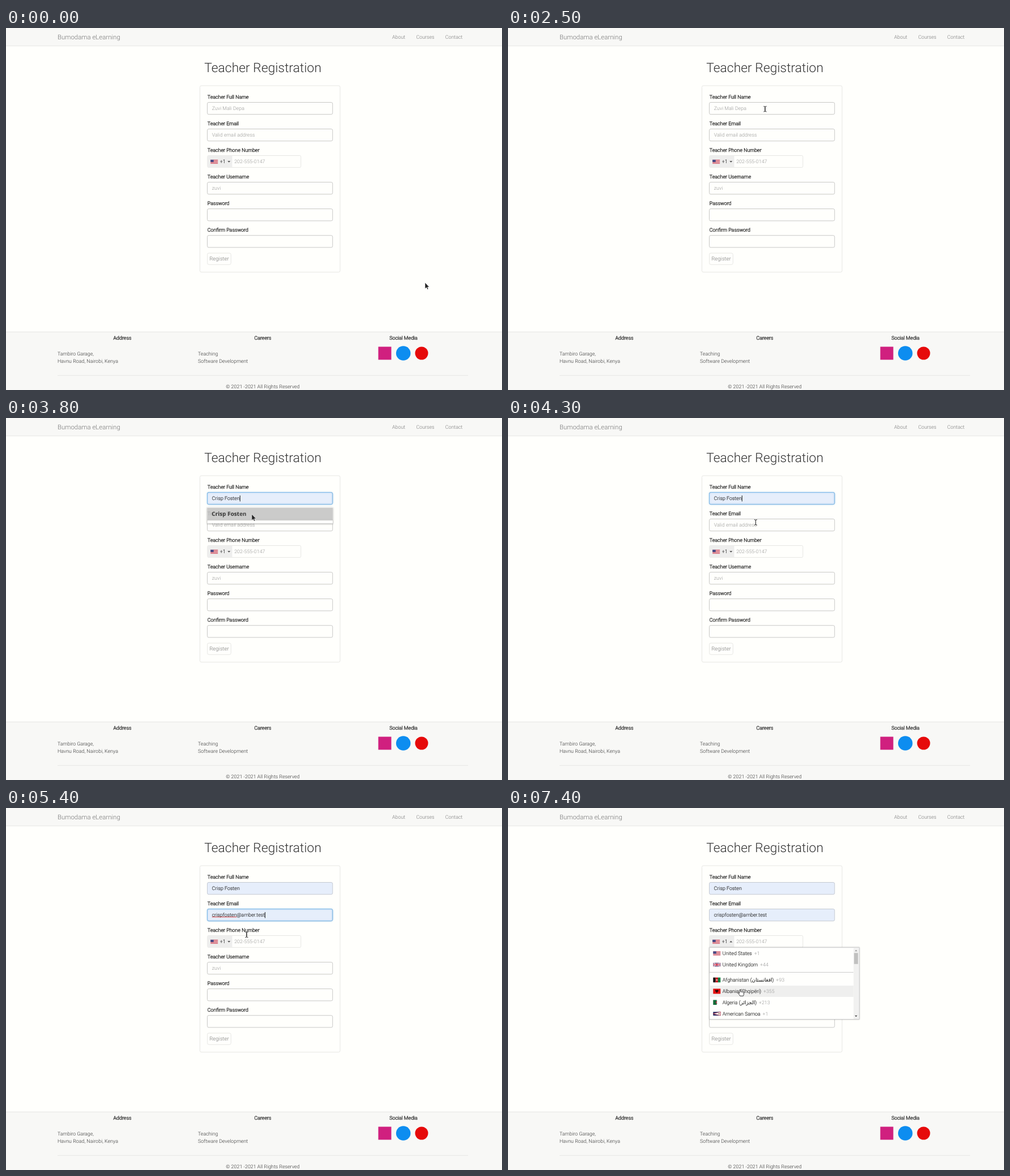
These frames come from a looping animation (876 by 640 pixels, 8 s). An HTML page:

```html
<!DOCTYPE html>
<html lang="en">
<head>
<meta charset="utf-8">
<title>Teacher Registration</title>
<style>
html, body { margin: 0; width: 100%; height: 100%; overflow: hidden; background: #fffffc }
svg { display: block; font: 300 8.9px Roboto, sans-serif; text-rendering: geometricPrecision }
text { fill: #333; white-space: pre }
.bar { fill: #f8f8f6 }
.line { fill: none; stroke: #e7e7e4 }
.nav { fill: #777 }
.bold { stroke: #333; stroke-width: .4 }
.dark { fill: #2a2a2a; stroke: #2a2a2a; stroke-width: .15 }
.mid { text-anchor: middle }
.hint { fill: #959595; stroke: none }
.box { fill: #fffffc; stroke: #c8c8c6 }
.box.filled { fill: #e6eefb; stroke: #c4c9d2 }
.glow { fill: none; stroke: #79b7e8; filter: drop-shadow(0 0 1.6px #66afe999) }
.preview { font: 400 8.9px "Liberation Sans", sans-serif; fill: #111 }
.popup { fill: #fffffd; filter: drop-shadow(0 1.5px 1.5px #0006) }
.sheet { fill: #fffffd; stroke: #ccc; filter: drop-shadow(.6px .6px 1.2px #0004) }
.option { font: 600 10px "Noto Sans", sans-serif; fill: #2c2c2c }
.halo { stroke: #fff; fill: none; stroke-width: 2; opacity: .7 }
.beam { stroke: #222; fill: none; stroke-width: 1 }
</style>
</head>
<body>
<svg width="876" height="640" viewBox="0 0 876 640"></svg>
<script>
const PERSON = 'Crisp Fosten', USER = 'crispfosten', MAIL = USER + '@amber.test';
const svg = document.querySelector('svg');

const rect = (x, y, w, h, attrs = '') => `<rect x="${x}" y="${y}" width="${w}" height="${h}" ${attrs}/>`;
const text = (x, y, s, cls = '', attrs = '') => `<text x="${x}" y="${y}" class="${cls}" ${attrs}>${s}</text>`;
const path = (d, attrs = '') => `<path d="${d}" ${attrs}/>`;

// Flags are drawn in a 13-unit wide box
const flags = {
  us: rect(0, 0, 13, 7, 'fill="#f4e9ea"') +
    [0, 2, 4, 6].map(y => rect(0, y, 13, 1, 'fill="#c8354a"')).join('') + rect(0, 0, 5.5, 4, 'fill="#434a86"'),
  uk: rect(0, 0, 13, 6.5, 'fill="#2b3a78"') +
    path('M0 0 13 6.5M13 0 0 6.5M6.5 0V6.5M0 3.25H13', 'stroke="#fff" stroke-width="1.8"') +
    path('M0 0 13 6.5M13 0 0 6.5', 'stroke="#c8102e" stroke-width=".5"') +
    path('M6.5 0V6.5M0 3.25H13', 'stroke="#c8102e" stroke-width="1.1"'),
  af: rect(0, 0, 4.4, 8.6, 'fill="#111"') + rect(4.3, 0, 4.4, 8.6, 'fill="#c4141c"') +
    rect(8.6, 0, 4.4, 8.6, 'fill="#0a8043"') + '<circle cx="6.5" cy="4.3" r="1.5" fill="#e6a9a5"/>',
  al: rect(0, 0, 13, 9, 'fill="#e3100f"') +
    path('M6.5 2.8 8.6 1.6 9.6 4.5 7.6 5.4 6.5 7.8 5.4 5.4 3.4 4.5 4.4 1.6Z', 'fill="#2a0505"'),
  dz: rect(0, 0, 6.5, 8.6, 'fill="#126b38"') + rect(6.5, 0, 6.5, 8.6, 'fill="#fff"') +
    path('M7.8 2.8A2 2 0 1 0 7.8 5.8 1.6 1.6 0 1 1 7.8 2.8Z', 'fill="#d21034"'),
  as: rect(0, 0, 13, 6.5, 'fill="#22285f"') + path('M13 0V6.5L0 3.25Z', 'fill="#fff" stroke="#b5263c" stroke-width=".7"') +
    path('M8 3 12 2.2 11 4.4Z', 'fill="#8a5a33"')
};
const flag = (id, x, cy) => {
  const h = { us: 7, uk: 6.5, af: 8.6, al: 9, dz: 8.6, as: 6.5 }[id];
  return `<g transform="translate(${x} ${cy - h / 2})">${flags[id]}</g>`;
};

const fields = [
  ['Teacher Full Name', 'Zuvi Mali Depa'], ['Teacher Email', 'Valid email address'], ['Teacher Phone Number'],
  ['Teacher Username', 'zuvi'], ['Password', ''], ['Confirm Password', '']
];
const form = fields.map(([label, hint], i) => {
  const y = 131.5 + i * 47.05;
  return text(355.8, y - 7, label, 'bold') + (hint === undefined ? '' :
    rect(355.5, y, 221.3, 21.2, `rx="2.5" class="box" id="box${i}"`) + text(363.8, y + 13.6, hint, 'hint', `id="hint${i}"`));
}).join('');

// Filled value, focus glow, caret and suggestion popup of a field
const live = (i, value) => {
  const y = 131.5 + i * 47.05;
  return rect(355.5, y, 221.3, 21.2, `rx="2.5" class="glow" id="glow${i}"`) +
    text(363.8, y + 13.6, value, '', `id="value${i}"`) +
    rect(363.8, y + 5.5, .9, 10.5, `id="caret${i}"`);
};
const popup = (i, value) => {
  const y = 158 + i * 47.05;
  return `<g id="popup${i}">` + rect(355.3, y - .7, 222, 29, 'class="popup"') +
    rect(355.3, y + .5, 221.7, 22.7, `fill="#c6c6c5" id="hot${i}"`) + text(363.3, y + 15.4, value, 'option') + '</g>';
};

const countries = [
  ['us', 257, 'United States', 1], ['uk', 277, 'United Kingdom', 44],
  ['af', 304, 'Afghanistan (افغانستان\u200e)', 93], ['al', 324, 'Albania (Shqipëri)', 355],
  ['dz', 343.7, 'Algeria (الجزائر\u200e)', 213], ['as', 363.7, 'American Samoa', 1]
];
const list = '<g id="list">' + rect(355.8, 246.7, 264.5, 126.8, 'class="sheet"') +
  rect(356.3, 0, 254, 19.8, 'fill="#efefee" id="row"') +
  path('M356 290.5H610', 'stroke="#ccc"') +
  countries.map(([id, y, name, code]) => flag(id, 362.3, y) +
    text(378.8, y + 3.2, `${name}<tspan class="hint" dx="3.8">+${code}</tspan>`, 'dark')).join('') +
  rect(610.3, 247.2, 9.5, 125.8, 'fill="#f1f1f0"') + rect(611.2, 256.3, 7, 19.5, 'fill="#c1c1c0"') +
  path('M612.5 253.3h4.4l-2.2-2.6z', 'fill="#999"') + path('M612.5 366.7h4.4l-2.2 2.6z', 'fill="#444"') + '</g>';

const beam = 'M-2.5-4.8Q0-4.8 0-3.5V3.5Q0 4.8-2.5 4.8M2.5-4.8Q0-4.8 0-3.5V3.5Q0 4.8 2.5 4.8';
const cursors =
  path('M0 0V11L2.6 8.7 4.2 12.3 6 11.5 4.4 8.1H7.6Z', 'id="arrow" fill="#222" stroke="#fff" stroke-width=".6"') +
  `<g id="beam">${path(beam, 'class="halo"')}${path(beam, 'class="beam"')}</g>` +
  path('M-2.6 1.2V-4.8Q-1.6-6.2-.6-4.8V-1.6Q3-1.8 5-.2V3Q4.6 4.4 4 5.8H-1.6Q-3.6 3-5 1-4.4-.7-2.6 1.2Z',
    'id="hand" fill="#fff" stroke="#222" stroke-width=".9"');

svg.innerHTML =
  rect(0, 0, 876, 31.5, 'class="bar"') + path('M0 31.7H876', 'class="line"') +
  text(91, 19.7, 'Bumodama eLearning', 'nav', 'font-size="11.45"') +
  text(682, 19, 'About', 'nav') + text(724.4, 19, 'Courses', 'nav') + text(775.7, 19, 'Contact', 'nav') +
  text(350.2, 77.5, 'Teacher Registration', '', 'font-size="22.9"') +
  rect(342.5, 102, 247.5, 329.6, 'rx="2.5" class="line"') + form +
  rect(355.8, 225.5, 165, 21, 'rx="2" class="line"') + rect(356, 225.7, 43.5, 20.7, 'fill="#eeeeed"') +
  flag('us', 361.2, 236.4) + text(377.8, 239.2, '+1', 'dark') + path('', 'id="tick" fill="#555"') +
  text(403.2, 239.2, '202-555-0147', 'hint') +
  rect(355.7, 398, 41.6, 20.2, 'rx="2.5" class="line"') + text(376.5, 411, 'Register', 'nav mid', 'font-size="9.5"') +
  rect(0, 537, 876, 103, 'class="bar"') + path('M0 537.3H876M91 614.3H816', 'class="line"') +
  text(205.5, 551.3, 'Address', 'bold mid') + text(453.5, 551.3, 'Careers', 'bold mid') +
  text(702, 551.3, 'Social Media', 'bold mid') +
  text(91, 579, 'Tambiro Garage,') + text(91, 591.6, 'Havnu Road, Nairobi, Kenya') +
  text(339, 579, 'Teaching') + text(339, 591.6, 'Software Development') +
  text(453.5, 636.6, '© 2021 -2021 All Rights Reserved', 'mid') +
  rect(657.5, 563.5, 23, 23, 'fill="#d0207f"') + '<circle cx="701.7" cy="575" r="12.8" fill="#0d8df0"/>' +
  '<circle cx="734" cy="575" r="11.5" fill="#e60a0a"/>' +
  live(0, PERSON) + live(1, MAIL) + path('', 'id="squiggle" stroke="#d33" stroke-width=".9"') +
  popup(0, PERSON) + popup(1, MAIL) + list + `<g id="cursor">${cursors}</g>`;

const $ = id => document.getElementById(id);
const show = (id, on) => $(id).setAttribute('opacity', +on);

// Pointer track: time, x, y, shape
const track = [
  [0, 740, 450, 'arrow'], [300, 740, 450, 'arrow'], [400, 726, 427, 'arrow'], [500, 726, 427, 'arrow'],
  [600, 640, 300, 'arrow'], [700, 573, 188.5, 'beam'], [800, 573, 188.5, 'beam'], [900, 470, 112, 'arrow'],
  [1000, 388.5, 68.5, 'beam'], [1100, 388.5, 68.5, 'beam'], [1300, 378.5, 80.5, 'beam'], [1400, 378.5, 80.5, 'beam'],
  [1500, 384, 74, 'arrow'], [1600, 384, 74, 'arrow'], [1800, 440, 73, 'arrow'], [2000, 525, 101, 'arrow'],
  [2200, 500, 134, 'beam'], [2500, 454, 143.2, 'beam'], [3200, 454, 143.2, 'beam'], [3400, 446, 158, 'arrow'],
  [3600, 434, 170, 'arrow'], [4100, 434, 170, 'arrow'], [4200, 436, 180, 'beam'], [4400, 439, 189, 'beam'],
  [4700, 439, 191, 'arrow'], [4800, 439, 193, 'arrow'], [5000, 428, 214, 'arrow'], [5200, 428, 215, 'arrow'],
  [5400, 425, 224, 'beam'], [5800, 396, 240, 'hand'], [6000, 390.5, 243, 'hand'], [6600, 390.5, 243, 'hand'],
  [6900, 395, 262, 'hand'], [7200, 407, 306, 'hand'], [7400, 411.5, 326.5, 'hand']
];
function pointer(t) {
  const i = track.findLastIndex(k => k[0] <= t), a = track[i], b = track[i + 1] || a;
  const p = (t - a[0]) / (b[0] - a[0] || 1);
  return { x: a[1] + (b[1] - a[1]) * p, y: a[2] + (b[2] - a[2]) * p, shape: a[3] };
}

const steps = [
  { focus: 2800, open: 2900, hover: 3500, pick: 3800, blur: 4400 },
  { focus: 4400, open: 4600, hover: 4700, pick: 5200, blur: 6200 }
];
function drawField(i, t) {
  const { focus, open, hover, pick, blur } = steps[i], value = $('value' + i);
  const filled = t >= hover, focused = t >= focus && t < blur;
  const fadeIn = t < focus ? 0 : t < focus + 100 ? .5 : 1;
  const fadeOut = t < blur ? 1 : t < blur + 100 ? .5 : 0;
  show('glow' + i, fadeIn * fadeOut);
  $('box' + i).classList.toggle('filled', filled);
  show('hint' + i, !filled);
  show('value' + i, filled);
  value.setAttribute('class', t < pick ? 'preview' : 'dark');
  show('caret' + i, focused);
  $('caret' + i).setAttribute('x', 363.8 + (t < pick ? 0 : value.getComputedTextLength()));
  show('popup' + i, t < open ? 0 : t < pick ? 1 : t < pick + 100 ? .9 : t < pick + 200 ? .4 : 0);
  show('hot' + i, filled);
}

function draw(now) {
  const t = Math.floor(now % 8000 / 100) * 100;
  const { x, y, shape } = pointer(t);
  drawField(0, t);
  drawField(1, t);
  const underline = t >= steps[1].pick && t < steps[1].blur;
  $('squiggle').setAttribute('d', underline ? `M363.8 192.8H${363.8 + $('value1').getSubStringLength(0, USER.length)}` : '');

  const open = t >= 6400;
  show('list', open);
  $('tick').setAttribute('d', open ? 'M391.3 237.6h5l-2.5-2.8z' : 'M391.3 235h5l-2.5 2.8z');
  const hot = countries.findLast(c => y - 5 > c[1] - 10) || countries[0];
  $('row').setAttribute('y', (open ? hot : countries[0])[1] - 9.9);

  $('cursor').setAttribute('transform', `translate(${x} ${y})`);
  for (const id of ['arrow', 'beam', 'hand']) show(id, id === shape);
}

const start = performance.now();
(function loop() {
  draw(performance.now() - start);
  requestAnimationFrame(loop);
})();
</script>
</body>
</html>
```
